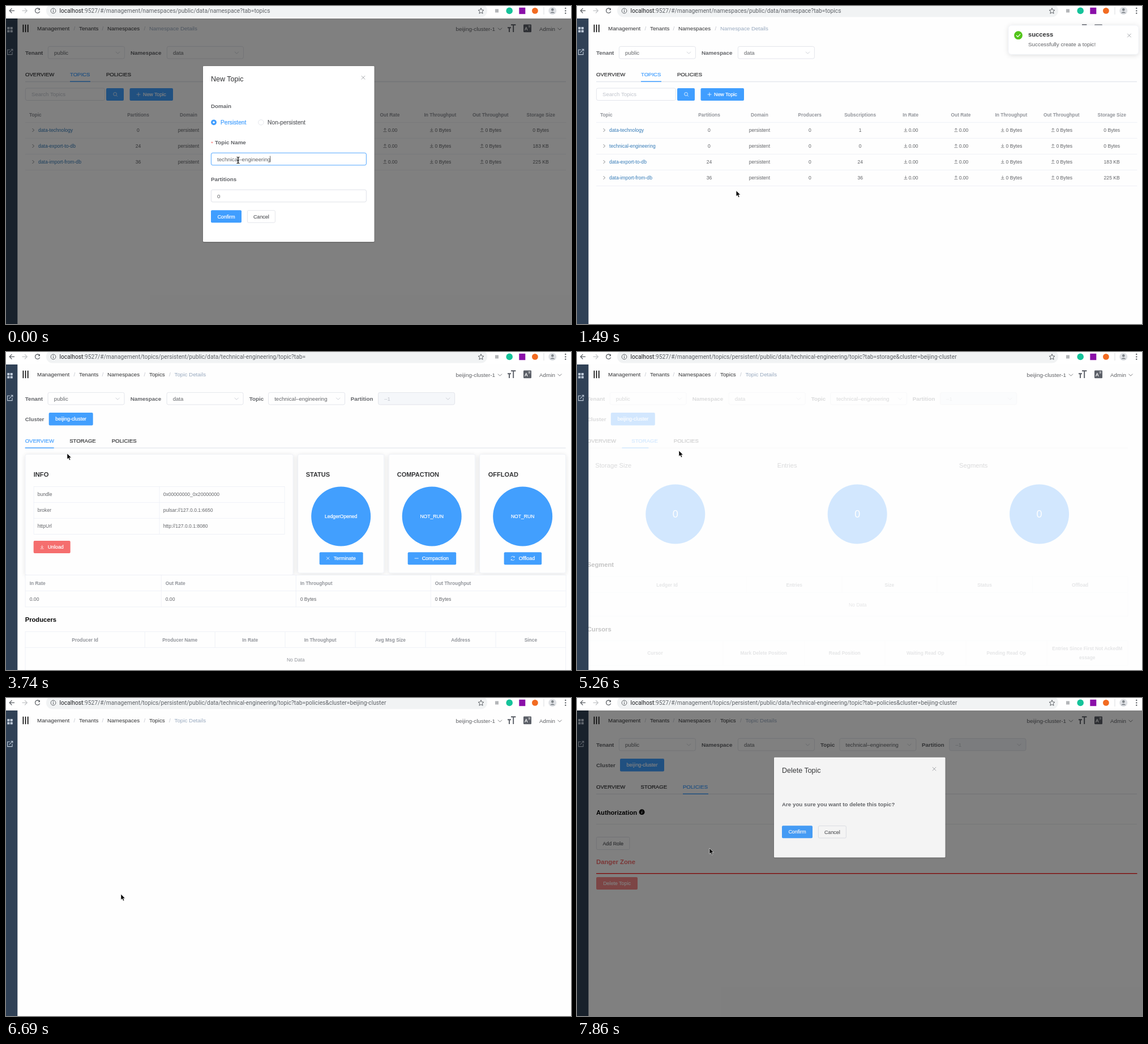
Write an HTML page that moves like this. It is 998 px wide and 561 px high and loops after 8 s.

```html
<!DOCTYPE html>
<html lang="en">
<head>
<meta charset="utf-8">
<title>Topic management</title>
<style>
html, body { margin: 0; width: 100%; height: 100%; overflow: hidden; background: #fefefe; }
svg { display: block; width: 100vw; height: 100vh; font-family: "Liberation Sans", Arial, sans-serif; }
.url { font-family: Roboto, sans-serif; }
text { white-space: pre; }
</style>
</head>
<body>
<svg id="stage" viewBox="0 0 998 561">
  <defs>
    <filter id="shadow" x="-10%" y="-20%" width="120%" height="150%">
      <feDropShadow dx="0" dy="1.4" stdDeviation="4" flood-color="#000" flood-opacity=".12"/>
    </filter>
    <filter id="edge" x="-5%" y="-5%" width="110%" height="110%">
      <feDropShadow dx="0" dy=".7" stdDeviation=".8" flood-color="#000" flood-opacity=".3"/>
    </filter>
  </defs>
  <g id="scene"></g>
</svg>
<script>
const LOOP = 8000;
const BLUE = '#409eff', RED = '#f56c6c', INK = '#303133', TEXT = '#606266',
      MUTED = '#909399', PALE = '#c0c4cc', LINE = '#ebeef5', EDGE = '#dcdfe6';

// Screen updates come in bursts: [first, last, count]
const bursts = [[0, 0, 1], [150, 600, 4], [1050, 2080, 8], [2230, 2230, 1], [2670, 3590, 7],
  [3740, 4190, 4], [4490, 5260, 6], [5440, 5740, 3], [6040, 6690, 5], [6830, 7420, 5], [7710, 7860, 2]];
const ticks = bursts.flatMap(([a, b, n]) =>
  Array.from({ length: n }, (_, i) => Math.round(a + (n > 1 ? (b - a) * i / (n - 1) : 0))));

const clamp = v => Math.max(0, Math.min(1, v));
const mix = (a, b, p) => a + (b - a) * p;

// CSS "ease" curve
function ease(x) {
  x = clamp(x);
  let lo = 0, hi = 1, u = .5;
  for (let i = 0; i < 20; i++) {
    u = (lo + hi) / 2;
    const at = .75 * u * (1 - u) * (1 - u) + .75 * u * u * (1 - u) + u * u * u;
    if (at < x) lo = u; else hi = u;
  }
  return .3 * u * (1 - u) * (1 - u) + 3 * u * u * (1 - u) + u * u * u;
}

// Drawing helpers; text is placed by its vertical centre
function text(x, y, s, size = 9.8, fill = TEXT, { bold, med, mid } = {}) {
  return `<text x="${x}" y="${(y + size * .36).toFixed(2)}" font-size="${size}" fill="${fill}"` +
    (bold ? ' font-weight="700"' : '') + (mid ? ' text-anchor="middle"' : '') +
    (med ? ` stroke="${fill}" stroke-width=".22"` : '') + `>${s}</text>`;
}
const bold = (x, y, s, size, fill, mid) => text(x, y, s, size, fill, { bold: 1, mid });
const rect = (x, y, w, h, fill, r = 0, stroke = 'none', sw = .8) =>
  `<rect x="${x}" y="${y}" width="${w}" height="${h}" rx="${r}" fill="${fill}" stroke="${stroke}" stroke-width="${sw}"/>`;
const circle = (x, y, r, fill, stroke = 'none', sw = .8) =>
  `<circle cx="${x}" cy="${y}" r="${r}" fill="${fill}" stroke="${stroke}" stroke-width="${sw}"/>`;
const path = (d, stroke, w = .8, fill = 'none') =>
  `<path d="${d}" stroke="${stroke}" stroke-width="${w}" fill="${fill}"/>`;
const group = (inner, x = 0, y = 0, opacity = 1) =>
  `<g transform="translate(${x} ${y})" opacity="${opacity}">${inner}</g>`;
const filtered = (inner, id) => `<g filter="url(#${id})">${inner}</g>`;
const hline = (x1, x2, y, c = LINE, w = .8) => path(`M${x1} ${y}H${x2}`, c, w);
const vline = (x, y1, y2, c = LINE, w = .8) => path(`M${x} ${y1}V${y2}`, c, w);
const chevron = (x, y, c) => path(`M${x - 3.5} ${y - 1.8}l3.5 3.5 3.5 -3.5`, c);
const cross = (x, y, r, c) => path(`M${x - r} ${y - r}l${2 * r} ${2 * r}m0 ${-2 * r}l${-2 * r} ${2 * r}`, c);
const download = (x, y, c) => path(`M${x - 3} ${y + 3}h6M${x} ${y - 3.2}v4.6m-2.2 -2.2l2.2 2.2 2.2 -2.2`, c, .7);
const upload = (x, y, c) => path(`M${x - 3} ${y + 3}h6M${x} ${y + 1.6}v-4.6m-2.2 2.2l2.2 -2.2 2.2 2.2`, c, .7);

function button(x, y, w, s, fill, tx, h = 22) {
  const plain = fill === '#fff';
  return rect(x, y, w, h, fill, 2, plain ? EDGE : 'none') +
    text(tx ?? x + w / 2, y + h / 2, s, 8.9, plain ? TEXT : '#fff', { med: 1, mid: tx === undefined });
}

function select(label, lx, x, value, off) {
  return bold(lx, 82, label) + rect(x + .4, 71.4, 135, 21.5, off ? '#f5f7fa' : '#fff', 2.8, EDGE) +
    text(x + 11, 82.3, value, 9.6, off ? PALE : TEXT) + chevron(x + 123.5, 82.5, PALE);
}

// The underline travels from the first tab to the active one
function tabs(y, items, active, hover, slide = 1) {
  let out = hline(34, 989, y + 13.2, '#e4e7ed', 1.4);
  for (const [x, s, w] of items) {
    out += text(x, y, s, 9.55, s === active || s === hover ? BLUE : INK, { med: 1 });
    const bar = mix(34, x, slide);
    if (s === active) out += hline(bar, bar + w, y + 13, BLUE, 1.4);
  }
  return out;
}

const filters = () => select('Tenant', 34, 74, 'public') + select('Namespace', 220, 284, 'data');

const columns = ['Partitions', 'Domain', 'Producers', 'Subscriptions', 'In Rate', 'Out Rate',
  'In Throughput', 'Out Throughput', 'Storage Size'];
const topics = [['data-technology', 0, 1, '0 Bytes'], ['technical-engineering', 0, 0, '0 Bytes'],
  ['data-export-to-db', 24, 24, '183 KB'], ['data-import-from-db', 36, 36, '225 KB']];

function topicRow([name, parts, subs, size], y, hovered, linked) {
  const cell = (i, s, dx = 0) => text(233.5 + 88.9 * i + dx, y, s, 8.6, TEXT, { mid: 1 });
  let out = hovered ? rect(34, y - 13.5, 955.5, 28, '#f5f7fa') : '';
  out += path(`M46.5 ${y - 3}l3 3 -3 3`, TEXT, .8) + text(57, y, name, 8.6, linked ? BLUE : '#337ab7');
  out += cell(0, parts) + cell(1, 'persistent') + cell(2, 0) + cell(3, subs);
  ['0.00', '0.00', '0 Bytes', '0 Bytes'].forEach((s, i) => {
    const x = 589 + 88.9 * i;
    out += cell(4 + i, s, 5) + (i % 2 ? upload : download)(x - (i < 2 ? 8.5 : 15), y - .3, TEXT);
  });
  return out + cell(8, size) + hline(34, 989.5, y + 14.4);
}

function namespacePage(t, cur) {
  let out = filters() + tabs(120.3, [[34, 'OVERVIEW', 51], [113, 'TOPICS', 36], [177, 'POLICIES', 45]], 'TOPICS');
  out += rect(34.4, 145, 140, 21.5, '#fff', 2.8, EDGE) + text(45, 156, 'Search Topics', 9.6, PALE);
  out += rect(177, 145, 31, 22, BLUE, 2) + circle(192.6, 155.4, 2.9, 'none', '#fff') + path('M194.8 157.6l2 2', '#fff');
  out += button(218.5, 145, 76.5, 'New Topic', BLUE, 242) + path('M230.5 156h7m-3.5 -3.5v7', '#fff');
  out += bold(41, 192, 'Topic', 8.4, MUTED) + hline(34, 989.5, 205.4);
  columns.forEach((s, i) => out += bold(233.5 + 88.9 * i, 192, s, 8.4, MUTED, 1));
  if (t > 1000 && t < 1100)
    return out + text(512, 227, 'No Data', 8.6, MUTED, { mid: 1 }) + hline(34, 989.5, 247.4);
  const shown = t < 1000 ? topics.filter((_, i) => i !== 1) : topics;
  const hover = t > 1100 ? Math.floor((cur.y - 205) / 28) : -1;
  shown.forEach((row, i) => out += topicRow(row, 219 + 28 * i, i === hover, i === 1 && t >= 2230));
  return out;
}

// Bordered table header: edges are the column boundaries
function tableHead(edges, names, top, bottom) {
  let out = hline(34, 989, top) + hline(34, 989, bottom);
  edges.forEach(x => out += vline(x, top, bottom));
  names.forEach((s, i) => out += bold((edges[i] + edges[i + 1]) / 2, (top + bottom) / 2 + .2, s, 8.4, MUTED, 1));
  return out;
}
const noData = y => text(512, y, 'No Data', 8.6, MUTED, { mid: 1 });

function overviewPane() {
  const card = (x, w, h) => rect(x, 180.4, w, h, '#fff', 2.8, LINE);
  let out = filtered(card(34.4, 473, 213) + card(516, 152, 209.5) + card(676.5, 152.5, 209.5) + card(837, 152, 209.5), 'shadow');
  out += bold(49, 216, 'INFO', 11.2, INK) + rect(49.4, 237.4, 443, 84, 'none', 0, LINE) + vline(271.4, 237.4, 321.4);
  [['bundle', '0x00000000_0x20000000'], ['broker', 'pulsar://127.0.0.1:6650'], ['httpUrl', 'http://127.0.0.1:8080']]
    .forEach(([k, v], i) => {
      const y = 251.3 + 28 * i;
      out += text(56, y, k, 8.6) + text(278, y, v, 8.6) + (i ? hline(49, 492, y - 13.9) : '');
    });
  out += button(49, 333, 65, 'Unload', RED, 74) + download(64, 344, '#fff');
  [['STATUS', 530, 592, 'LedgerOpened'], ['COMPACTION', 691, 752.5, 'NOT_RUN'], ['OFFLOAD', 852, 913, 'NOT_RUN']]
    .forEach(([s, x, cx, state]) => out += bold(x, 216, s, 11, INK) + circle(cx, 290, 52.5, BLUE) +
      text(cx, 290, state, 8.6, '#fff', { mid: 1, med: 1 }));
  out += button(554, 353.2, 77, 'Terminate', BLUE, 579) + cross(569, 364, 2.5, '#fff');
  out += button(710, 353.2, 85.5, 'Compaction', BLUE, 735) + hline(722, 729, 364, '#fff');
  out += button(880, 353.2, 66.5, 'Offload', BLUE, 906);
  out += path('M892.4 362.4a3.3 3.3 0 0 1 6 -.2v-2m0 2h-2M898.6 365.6a3.3 3.3 0 0 1 -6 .2v2m0 -2h2', '#fff', .7);
  out += rect(34.4, 393.4, 955, 56.4, '#fff', 0, LINE) + hline(34, 989, 421.4);
  [['In Rate', '0.00'], ['Out Rate', '0.00'], ['In Throughput', '0 Bytes'], ['Out Throughput', '0 Bytes']]
    .forEach(([k, v], i) => {
      const x = i ? 44 + 238 * i : 42;
      out += bold(x, 408, k, 8.4, MUTED) + text(x, 435.5, v, 8.6) + (i ? vline(x - 7.5, 393, 450) : '');
    });
  out += bold(34, 471.7, 'Producers', 11.2, '#000');
  out += tableHead([34.4, 245.5, 369.5, 493.4, 617.4, 741.4, 865.4, 989], ['Producer Id', 'Producer Name', 'In Rate',
    'In Throughput', 'Avg Msg Size', 'Address', 'Since'], 493.4, 521.4);
  return out + vline(34.4, 521, 561) + vline(989, 521, 561) + noData(543);
}

function storagePane() {
  let out = '';
  ['Storage Size', 'Entries', 'Segments'].forEach((s, i) => {
    const cx = 190 + 321.4 * i;
    out += text(48.5 + 321.4 * i, 200, s, 11.2, TEXT) + circle(cx, 286, 52.5, BLUE) + text(cx, 286, 0, 18, '#fff', { mid: 1 });
  });
  out += bold(34, 375, 'Segment', 11.2, '#000') + tableHead([34.4, 316, 484, 652, 820.5, 989],
    ['Ledger Id', 'Entries', 'Size', 'Status', 'Offload'], 396.4, 424.4);
  out += noData(446) + hline(34, 989, 466.4) + vline(34.4, 424, 466) + vline(989, 424, 466);
  out += bold(34, 488.5, 'Cursors', 11.2, '#000') + tableHead([34.4, 274, 418, 560, 703, 846, 989],
    ['Cursor', 'Mark Delete Position', 'Read Position', 'Waiting Read Op', 'Pending Read Op'], 509.4, 553);
  return out + bold(917.5, 523, 'Entries Since First Not AckedM', 8.4, MUTED, 1) + bold(917.5, 539, 'essage', 8.4, MUTED, 1);
}

function policiesPane(t) {
  return bold(34, 201.5, 'Authorization', 11.2, '#000') + circle(114.6, 201.2, 4.9, '#000') +
    `<text x="114.6" y="204.2" font-size="8" font-style="italic" font-weight="700" fill="#fff" text-anchor="middle" font-family="Liberation Serif, serif">i</text>` +
    hline(34, 989, 222.6, '#e4e7ed') + button(34.4, 245.4, 58.5, 'Add Role', '#fff') +
    bold(34, 289, 'Danger Zone', 11.3, RED) + hline(34, 989.5, 309.6, '#f00', 1.2) +
    button(34, 316, 73, 'Delete Topic', t > 7300 ? '#f78989' : RED);
}

// Pages slide right while fading out, then the next comes in from the left
const moves = [[2670, 3320], [4490, 5175], [6040, 6710]];

function topicPage(t) {
  const active = t < 4490 ? 'OVERVIEW' : t < 6040 ? 'STORAGE' : 'POLICIES';
  const hover = t < 4150 ? '' : t < 5000 ? 'STORAGE' : t >= 5700 && t < 6300 ? 'POLICIES' : '';
  const pane = { OVERVIEW: overviewPane, STORAGE: storagePane, POLICIES: policiesPane }[active];
  const enter = moves.map(m => m[1]).filter(e => e - 60 <= t).pop();
  return filters() + select('Topic', 430, 463.5, 'technical–engineering') + select('Partition', 609, 657.5, '–1', true) +
    bold(34, 118, 'Cluster') + button(76, 107, 78, 'beijing-cluster', BLUE, undefined, 22.5) +
    tabs(156.2, [[34, 'OVERVIEW', 51], [112.5, 'STORAGE', 47], [187, 'POLICIES', 45]], active, hover,
      ease((t - enter + 60) / 300)) + pane(t);
}

function content(t, cur) {
  let x = 0, opacity = 1, first = t < 2670;
  for (const [leave, enter] of moves) {
    if (t < leave) break;
    const out = t < enter, p = ease((t - (out ? leave : enter)) / 500);
    x = out ? 21 * p : -21 * (1 - p);
    opacity = out ? 1 - p : p;
    first = out && leave === 2670;
  }
  return opacity < .002 ? '' : group(first ? namespacePage(t, cur) : topicPage(t), x, 0, opacity);
}

function progress(t) {
  const start = moves.map(m => m[0]).filter(s => s <= t).pop();
  const d = t - start;
  if (!(d < 600)) return '';
  return group(rect(0, 21.6, 998 * mix(.215, 1, ease(d / 300)), 1.7, '#29d'), 0, 0, 1 - clamp((d - 350) / 250));
}

function header(t) {
  const crumb = (x, s) => text(x, 39.7, s, 9.8, INK), slash = x => text(x, 39.7, '/', 9.8, PALE);
  const pale = (x, s) => text(x, 39.7, s, 9.8, '#97a8be');
  const p = ease((t - 2670) / 500);
  let out = [30.4, 34.5, 38.7].map(x => vline(x, 32.8, 46.2, '#000', 1.6)).join('');
  out += crumb(55, 'Management') + slash(119.5) + crumb(129, 'Tenants') + slash(169.5) + crumb(179, 'Namespaces') + slash(243.5);
  if (p < 1) out += group(pale(253, 'Namespace Details') + (t >= 2670 ? slash(345) : ''), 14 * p, 0, 1 - p);
  if (p > 0) out += group(crumb(253, 'Topics') + slash(288) + pale(297.5, 'Topic Details'), 14 * (1 - p), 0, p);
  out += text(794.5, 40.3, 'beijing-cluster-1', 9.85) + chevron(872.5, 40.5, TEXT);
  out += path('M892 33.2h8.4M896.2 33v13M886 38.3h6M889 38v8', '#5a5e66', 1.9);
  out += rect(914, 32.6, 14, 13.6, '#5a5e66', 1.2) + bold(918.8, 40, 'A', 8.4, '#fff', 1);
  out += path('M922.3 35.2h4.2M924.4 34v1.2M923 35.4l3 3.2m0 -3.2l-3.2 3.2', '#fff', .6);
  return out + text(942, 40.3, 'Admin', 9.85) + chevron(978, 40.5, TEXT);
}

function sidebar() {
  const c = '#bfcbd9';
  let out = rect(0, 22, 20.3, 539, '#304156');
  for (const x of [2.2, 7.6]) for (const y of [37, 42.4]) out += rect(x, y, 4.2, 4.2, c, .6);
  return out + path('M7 77.2H2.6v8.4H11V81M5.6 82.4l6 -6M8.4 76.2h3.4v3.4', c, 1.1);
}

function browser(t) {
  const g = '#5f6368', topic = '/#/management/topics/persistent/public/data/technical-engineering/topic?tab=';
  const url = t < 2670 ? '/#/management/namespaces/public/data/namespace?tab=topics'
    : topic + (t < 4490 ? '' : (t < 6040 ? 'storage' : 'policies') + '&amp;cluster=beijing-cluster');
  let out = rect(0, 0, 998, 22, '#fff') + rect(71, -3, 779, 22.4, '#f1f3f4', 11);
  out += path('M15 8.3H6.4m4 -4.2l-4.2 4.2 4.2 4.2', g, 1.3) + path('M28.5 8.3h8.6m-4 -4.2l4.2 4.2 -4.2 4.2', '#c3c5c8', 1.3);
  out += path('M59.2 5.8a4.2 4.2 0 1 0 .5 3.8', g, 1.3) + path('M60 3.6v3.6h-3.6z', 'none', 0, g);
  out += circle(83.5, 8.5, 4.4, 'none', g, 1) + path('M83.5 7.8v3.2M83.5 5.8v1.1', g, 1.1);
  out += `<text class="url" x="94.5" y="12.1" font-size="10.26" fill="${g}"><tspan fill="#202124">localhost</tspan>:9527${url}</text>`;
  out += path('M839 3.6l1.4 3.4 3.6 .3 -2.7 2.4 .8 3.6 -3.1 -1.9 -3.1 1.9 .8 -3.6 -2.7 -2.4 3.6 -.3z', g, 1);
  out += rect(864, 5.5, 6, 6, '#b4b6b9') + circle(889.2, 8.4, 5.8, '#15c39a') + rect(906.3, 2.8, 11, 11.4, '#8a0fa8') +
    circle(934.4, 8.4, 5.4, '#f26b21') + vline(950, 2, 15, '#dadce0', 1);
  out += circle(965.3, 8.4, 7, '#dfe1e5') + circle(965.3, 6.4, 2.3, '#80868b') + path('M961 12.4q4.3 -4.4 8.6 0z', 'none', 0, '#80868b');
  return out + [4, 8.4, 12.8].map(y => circle(988.3, y, 1.2, g)).join('');
}

// Confirmation boxes with their dimmed backdrop
function dialogFrame(title, h, p, shade, body) {
  const box = filtered(rect(348, 106, 302.5, h, '#fff', 1.4), 'edge') + text(362, 128.2, title, 12.5, INK) +
    cross(631, 126.3, 3.2, MUTED) + body;
  return rect(0, 22, 998, 539, `rgba(0,0,0,${.5 * shade})`) + group(box, 0, -14 * (1 - p), p);
}

function newTopicDialog(t, cur) {
  const gone = t - 963, input = (y, s, edge) => rect(362.4, y, 274, 21.6, '#fff', 2.8, edge, .9) + text(373, y + 11, s, 9.7);
  const body = bold(362, 176, 'Domain') + circle(367, 205.3, 4.9, BLUE) + circle(367, 205.3, 1.7, '#fff') +
    text(379, 205.3, 'Persistent', 10.2, BLUE, { med: 1 }) + circle(450.4, 205.3, 4.7, '#fff', EDGE) +
    text(462, 205.3, 'Non-persistent', 10.3, TEXT, { med: 1 }) +
    text(362, 241, '*', 9.8, RED) + bold(369, 240.5, 'Topic Name') +
    input(259.2, 'technical–engineering', t < 1000 ? BLUE : EDGE) + (t < 500 ? vline(466.6, 264.5, 275.5, '#333', .8) : '') +
    bold(362, 305.5, 'Partitions') + input(324.2, '0', EDGE) +
    button(362, 360.3, 54, 'Confirm', cur.y > 360 ? '#66b1ff' : BLUE) + button(426.4, 360.7, 49, 'Cancel', '#fff', undefined, 21.4);
  return dialogFrame('New Topic', 310, 1 - ease(gone / 300), 1 - ease(gone / 200), body);
}

function deleteDialog(t) {
  const d = t - 7665;
  const body = bold(362, 188.6, 'Are you sure you want to delete this topic?', 9.75) +
    button(362, 226.4, 54, 'Confirm', BLUE) + button(426.4, 226.8, 49, 'Cancel', '#fff', undefined, 21.4);
  return dialogFrame('Delete Topic', 176.5, ease(d / 300), ease(d / 200), body);
}

function notice(t) {
  const box = rect(762, 34, 230, 51.5, '#fff', 5.6, LINE, .7);
  const body = filtered(box, 'shadow') + circle(779.5, 51.7, 7.4, '#52c41a') + path('M776 51.8l2.6 2.6 4.6 -4.8', '#fff', 1.3) +
    bold(797, 50.2, 'success', 11.2, INK) + text(797, 67.4, 'Successfully create a topic!', 9.85) + cross(975.5, 52, 3.2, MUTED);
  return group(body, 236 * (1 - ease((t - 985) / 300)), 0, 1 - ease((t - 2990) / 300));
}

// Pointer stops: time, x, y
const stops = [[0, 410, 272], [600, 390, 372], [1050, 390, 372], [2080, 113, 254], [2230, 111, 251], [2670, 111, 251],
  [3590, 108, 179], [3740, 108, 179], [4190, 135, 157], [4490, 135, 157], [5260, 180, 174], [5740, 207, 156],
  [6040, 207, 156], [6690, 203, 346], [6980, 188, 347], [7420, 72, 327], [7600, 72, 327], [7860, 234, 265]];
function pointer(t) {
  const i = stops.findIndex((s, k) => k === stops.length - 1 || stops[k + 1][0] > t);
  const a = stops[i], b = stops[i + 1] || a;
  const u = clamp((t - a[0]) / (b[0] - a[0] || 1)), p = u * u * (3 - 2 * u);
  return { x: mix(a[1], b[1], p), y: mix(a[2], b[2], p) };
}

function drawPointer(t, { x, y }) {
  const inside = (a, b) => t >= a && t <= b;
  if (t < 400 && y < 281)
    return group(path('M-2.5 -5.5q2.5 0 2.5 1.5v8q0 1.5 -2.5 1.5M2.5 -5.5q-2.5 0 -2.5 1.5M0 4q0 1.5 2.5 1.5M-1.5 1h3', '#000', 1.1), x, y);
  const hand = (t < 1000 && y > 360) || inside(2230, 2800) || inside(4150, 4700) || inside(5700, 6100) || inside(7400, 7650);
  const shape = hand
    ? 'M-1 1q1 -1.6 2 0v4l1 -.6 1.3 .6 1 -.3 1.2 .7 1 0q.8 .4 .6 2l-.9 3v2h-5.4l-.8 -2.2 -3 -3.4q-.3 -1.6 1.2 -.8l.8 .9z'
    : 'M0 0V10.2L2.4 8 4 11.9 5.8 11.1 4.2 7.4H7.4Z';
  return group(path(shape, hand ? '#000' : '#fff', hand ? .8 : .6, hand ? '#fff' : '#000'), x, y);
}

const scene = document.getElementById('scene');
function draw(t) {
  const cur = pointer(t);
  scene.innerHTML = rect(0, 0, 998, 561, '#fefefe') + content(t, cur) + header(t) + sidebar() + progress(t) +
    (t < 1260 ? newTopicDialog(t, cur) : '') + (t > 7665 ? deleteDialog(t) : '') +
    (t > 985 && t < 3290 ? notice(t) : '') + browser(t) + drawPointer(t, cur);
}

let shown = -1;
const begin = performance.now();
function frame() {
  const now = (performance.now() - begin) % LOOP;
  const tick = ticks.filter(v => v <= now).pop() ?? 0;
  if (tick !== shown) draw(shown = tick);
  requestAnimationFrame(frame);
}
frame();
</script>
</body>
</html>
```
